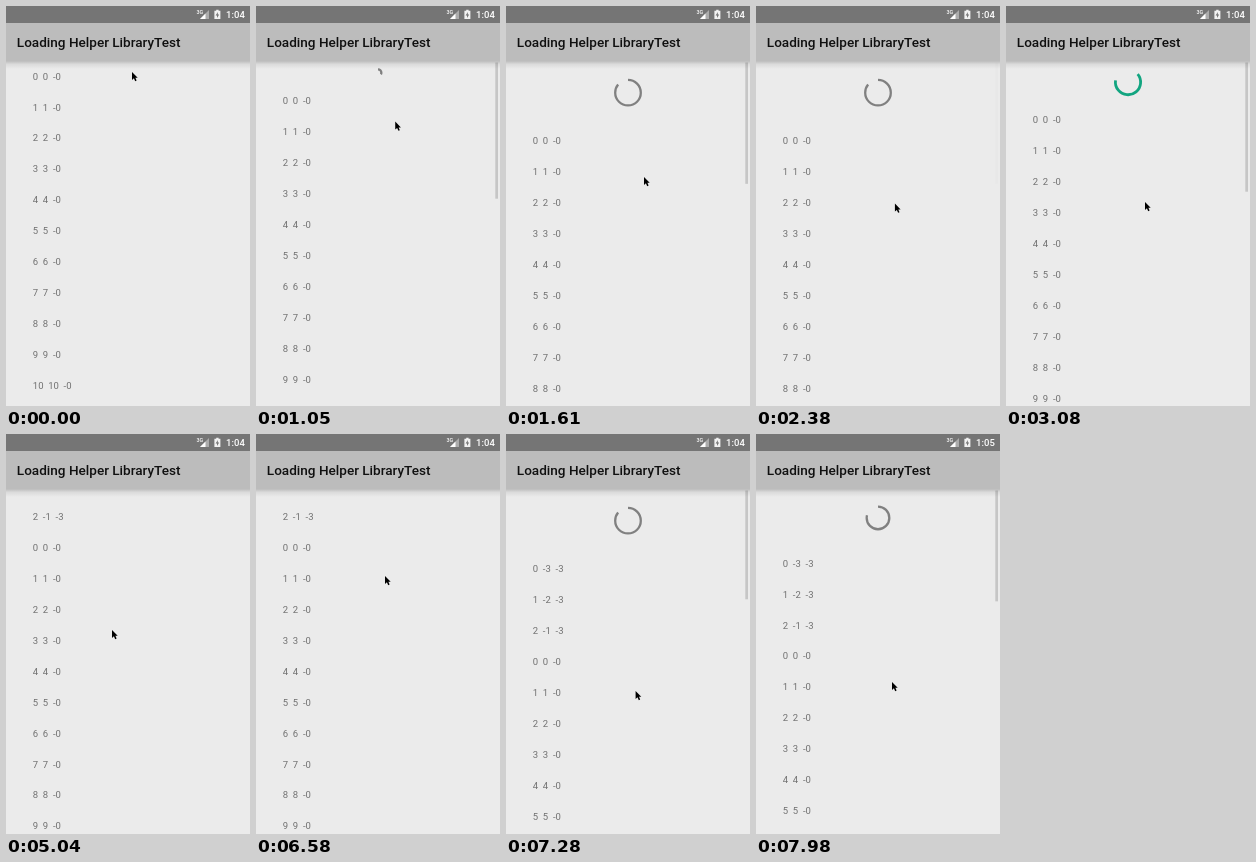
An HTML page for the animation above (8000 ms loop, 244x400 px).

```html
<!DOCTYPE html>
<html lang="en">
<head>
<meta charset="utf-8">
<title>Pull to load</title>
<style>
  html, body { margin: 0; width: 100%; height: 100%; overflow: hidden; background: #ebebeb; }
  svg { display: block; width: 100vw; height: 100vh; }
  text { font-family: Roboto, "Noto Sans", sans-serif; }
  .row { font-size: 9.5px; fill: #707070; }
  .title { font-size: 13.56px; font-weight: 500; fill: #101010; }
  .status { font-weight: 500; fill: #fff; }
</style>
</head>
<body>
<svg viewBox="0 0 244 400">
  <defs>
    <linearGradient id="shade" x1="0" y1="0" x2="0" y2="1">
      <stop offset="0" stop-color="#000" stop-opacity=".2"/>
      <stop offset=".4" stop-color="#000" stop-opacity=".07"/>
      <stop offset="1" stop-color="#000" stop-opacity="0"/>
    </linearGradient>
  </defs>
  <rect width="244" height="400" fill="#ebebeb"/>
  <g id="list"></g>
  <circle id="ring" fill="none" pathLength="360"/>
  <rect id="bar" x="239.3" width="2.7" fill="#c6c6c6"/>

  <rect y="55" width="244" height="8" fill="url(#shade)"/>
  <rect y="16" width="244" height="39" fill="#bcbcbc"/>
  <text class="title" x="10.8" y="41">Loading Helper LibraryTest</text>

  <rect width="244" height="17" fill="#757575"/>
  <text class="status" x="190.5" y="8.4" font-size="5.4">3G</text>
  <path d="M203 4V13H194Z" fill="#fff" opacity=".4"/>
  <path d="M199.5 7.5V13H194Z" fill="#fff"/>
  <path d="M210.2 3.8h2.4v1h1.8v8.2h-6V4.8h1.8Z" fill="#fff" opacity=".9"/>
  <path d="M211.8 6l-2.2 3.6h1.4v2.4l2.2-3.6h-1.4Z" fill="#757575"/>
  <text class="status" id="clock" x="238.8" y="12" font-size="9.5" text-anchor="end">1:04</text>

  <path id="cursor" d="M0 0V8L1.9 6.3L3.2 9.2L4.6 8.6L3.4 5.8H5.7Z"/>
</svg>
<script>
const LOOP = 8000, STEP = 70, ROWS = 16, PITCH = 30.94, ADDED = 3;
const MAX_PULL = 64.5, REST_PULL = 43.5, SCROLLED = -49.5;
const PULL = 700, RELEASE = 2660, SPIN = 2940, LOADED = 5040;
const PULL_2 = 6650, RELEASE_2 = 7910, MINUTE = 7700;

// Spans during which the scrollbar stays lit
const SCROLLS = [[PULL, 2100], [RELEASE, 3290], [PULL_2, 7490], [RELEASE_2, LOOP]];

// Pointer path: time, x, y
const PATH = [
  [0, 126, 66], [140, 140, 65], [700, 140, 81], [1610, 138, 171],
  [2450, 139, 200], [3080, 139, 196], [4000, 106, 196], [6090, 106, 196],
  [6300, 141, 148], [6580, 129, 142], [7280, 129.6, 257], [7980, 136, 248]
];

const $ = id => document.getElementById(id);
const set = (el, attrs) => { for (const k in attrs) el.setAttribute(k, attrs[k]); };
const clamp = x => Math.min(1, Math.max(0, x));
const smooth = x => x * x * (3 - 2 * x);
const ramp = (t, from, to) => clamp((t - from) / (to - from));
const settle = (t, from) =>
  (REST_PULL - MAX_PULL) * Math.sin(ramp(t, from, from + 420) * Math.PI / 2);

const listShift = t => t < LOADED
  ? MAX_PULL * ramp(t, PULL, 1610) + settle(t, RELEASE)
  : SCROLLED + (MAX_PULL - SCROLLED) * ramp(t, PULL_2, 7280) + settle(t, RELEASE_2);

const barOpacity = t => Math.max(...SCROLLS.map(([from, to]) =>
  t > from ? 1 - ramp(t, to, to + 300) : 0));

function pointer(t) {
  const i = PATH.findIndex(p => p[0] > t);
  const [t0, x0, y0] = PATH[i - 1] || PATH.at(-1), [t1, x1, y1] = PATH[i] || PATH.at(-1);
  const u = t1 > t0 ? ramp(t, t0, t1) : 0;
  return [x0 + (x1 - x0) * u, y0 + (y1 - y0) * u];
}

const rows = Array.from({ length: ROWS }, () => {
  const el = document.createElementNS("http://www.w3.org/2000/svg", "text");
  set(el, { class: "row", x: 26.8 });
  return $("list").appendChild(el);
});

function label(i, loaded) {
  const n = loaded ? i - ADDED : i;
  const parts = n < 0 ? [i, n, -ADDED] : [n, n, "-0"];
  return parts.join("\u00a0\u00a0");
}

function drawRing(t, pull) {
  const busy = t >= SPIN && t < LOADED;
  let start = 0, sweep = 360 * clamp(pull / 75), r = 12.8 * (pull / MAX_PULL) ** 1.4;
  if (busy) {
    const cycle = (t - 2196) / 1333, n = Math.floor(cycle), f = cycle - n;
    const head = smooth(clamp(2 * f)), tail = smooth(clamp(2 * f - 1));
    start = 504 * n + 288 * tail + 216 * f - 165;
    sweep = 12 + 288 * (head - tail);
    r = 12.6;
  }
  const y = 54.4 + pull / 2;
  set($("ring"), {
    cx: 122, cy: y, r,
    stroke: busy ? "#12a580" : "#808080",
    "stroke-width": busy ? 2.8 : 2.3,
    "stroke-dasharray": `${sweep} ${360 - sweep}`,
    transform: `rotate(${start - 90} 122 ${y})`,
    visibility: pull > 1 ? "visible" : "hidden"
  });
}

function draw(now) {
  const t = Math.floor((now % LOOP) / STEP) * STEP;
  const loaded = t >= LOADED, shift = listShift(t), pull = Math.max(0, shift);
  rows.forEach((el, i) => {
    el.textContent = label(i, loaded);
    el.setAttribute("y", 73.6 + PITCH * i + shift);
  });
  drawRing(t, pull);
  set($("bar"), {
    y: 56.5 + Math.max(0, -shift) * .4,
    height: (loaded ? 133 : 145.5) - .375 * pull,
    opacity: barOpacity(t)
  });
  $("clock").textContent = t < MINUTE ? "1:04" : "1:05";
  set($("cursor"), { transform: `translate(${pointer(t)})` });
}

const begin = performance.now();
function tick() {
  draw(performance.now() - begin);
  requestAnimationFrame(tick);
}
tick();
</script>
</body>
</html>
```
